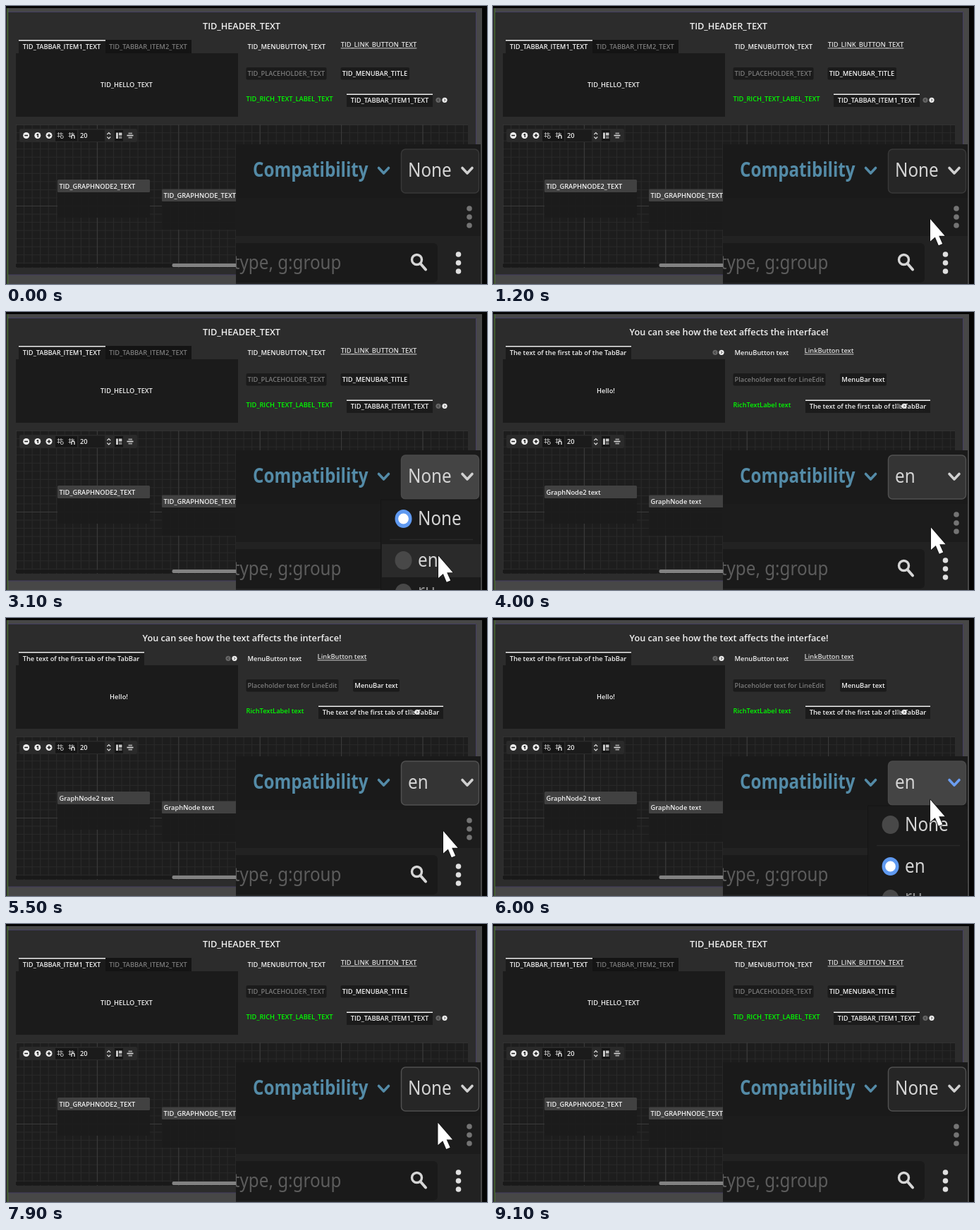
An HTML page that plays this animation: 682 px wide and 394 px high, repeating every 9.6 s.

```html
<!DOCTYPE html>
<html lang="en">
<head>
<meta charset="utf-8">
<title>Translation preview</title>
<style>
html, body { margin: 0; width: 100%; height: 100%; overflow: hidden; background: #050505; }
svg { display: block; width: 682px; height: 394px; }
text { font: 600 9.3px "Open Sans", sans-serif; fill: #f0f0f0; white-space: pre; }
.head { font-size: 12.7px; }
.mid { text-anchor: middle; }
.dim { fill: #7b7b7b; }
.rich { fill: #0f0; }
.link { text-decoration: underline; fill: #dcdcdc; }
.icon { font-size: 7px; font-weight: 800; fill: #191919; text-anchor: middle; }
.dark { fill: #1b1b1b; }
.title { fill: #414141; }
.zoom text { font: 400 24.2px "Noto Sans", sans-serif; fill: #d4d4d4; }
.zoom .renderer { font-weight: 700; fill: #548ba7; }
.zoom .hint { fill: #5c5c5c; }
.zoom .faint { fill: #8c8c8c; }
.chev { fill: none; stroke: #d0d0d0; stroke-width: 3.6; stroke-linecap: round; stroke-linejoin: round; }
.hidden { display: none; }
#button { fill: #262626; stroke: #383838; stroke-width: 1.5; }
#button.focus { stroke: #505050; }
#button.picked { fill: #343434; }
#button.hover { fill: #363636; }
#button.open { fill: #444; stroke: #4a4a4a; }
#arrow.hover { stroke: #6b9df0; }
.row { fill: #1b1b1b; }
.row.hover { fill: #2a2a2a; }
.radio { fill: #484848; }
.radio.on { fill: #5f99f0; }
.radio + circle { fill: #fff; visibility: hidden; }
.radio.on + circle { visibility: visible; }
</style>
</head>
<body>
<svg viewBox="0 0 682 394">
  <defs>
    <pattern id="minor" x="13.5" y="167.6" width="11.54" height="11.54" patternUnits="userSpaceOnUse">
      <path d="M.5 0V11.54M0 .5H11.54" stroke="#292929" fill="none"/>
    </pattern>
    <pattern id="major" x="13.5" y="167.6" width="115.4" height="115.4" patternUnits="userSpaceOnUse">
      <path d="M.5 0V115.4M0 .5H115.4" stroke="#3b3b3b" fill="none"/>
    </pattern>
    <clipPath id="inset"><path d="M326 196H673V394H326Z"/></clipPath>
    <g id="pager">
      <circle cx="-4.5" r="3.6" fill="#676767"/>
      <path d="M-3.8 -1.6L-5.4 0L-3.8 1.6" fill="none" stroke="#222"/>
      <circle cx="4.5" r="3.6" fill="#eee"/>
      <path d="M3.8 -1.6L5.4 0L3.8 1.6" fill="none" stroke="#222"/>
    </g>
    <g id="snap" fill="none" stroke="#bbb" stroke-width=".9">
      <path d="M-2.5 -4.5V3M1 -4.5V0M-4.5 -2.5H4M-4.5 1H0"/>
    </g>
  </defs>

  <!-- Editor viewport -->
  <path d="M0 3H675V394H0Z" fill="#474747"/>
  <path d="M2 8H667V381H2Z" fill="#2c2c2c"/>
  <path d="M2 8.5H666.5V381H2" fill="none" stroke="#443f63"/>
  <path d="M2.5 3V394" stroke="#4d7a30"/>
  <path d="M0 3H2V394H0Z" fill="#303030"/>

  <path class="dark" d="M14 67H329V157H14Z"/>

  <g id="keys">
    <text class="head mid" x="334" y="32.5">TID_HEADER_TEXT</text>
    <path class="dark" d="M18 48H141V67H18Z"/>
    <path d="M141 48H263V67H141Z" fill="#141414"/>
    <path d="M18 48H141V49.6H18Z" fill="#eee"/>
    <text class="mid" x="79" y="61">TID_TABBAR_ITEM1_TEXT</text>
    <text class="mid dim" x="201.5" y="61">TID_TABBAR_ITEM2_TEXT</text>
    <text class="mid" x="171" y="114.5">TID_HELLO_TEXT</text>
    <text x="342.5" y="61">TID_MENUBUTTON_TEXT</text>
    <text class="mid link" x="528.5" y="58.4">TID_LINK_BUTTON_TEXT</text>
    <rect class="dark" x="340.5" y="87" width="114" height="17.5" rx="2"/>
    <text class="dim" x="342.5" y="99.3">TID_PLACEHOLDER_TEXT</text>
    <rect class="dark" x="474.5" y="87" width="97.5" height="17.5" rx="2"/>
    <text class="mid" x="523" y="99.3">TID_MENUBAR_TITLE</text>
    <text class="rich" x="340.5" y="134.8">TID_RICH_TEXT_LABEL_TEXT</text>
    <path class="dark" d="M483 125H605V143H483Z"/>
    <path d="M483 124.5H605V126H483Z" fill="#eee"/>
    <text class="mid" x="544" y="137">TID_TABBAR_ITEM1_TEXT</text>
    <use href="#pager" x="617.5" y="133.3"/>
  </g>

  <g id="english">
    <text class="head mid" x="334.5" y="32.5">You can see how the text affects the interface!</text>
    <path class="dark" d="M18 48H196V67H18Z"/>
    <path d="M18 48H196V49.6H18Z" fill="#eee"/>
    <text class="mid" x="106.5" y="61">The text of the first tab of the TabBar</text>
    <use href="#pager" x="319.5" y="57.3"/>
    <text class="mid" x="160" y="114.5">Hello!</text>
    <text x="342.5" y="61">MenuButton text</text>
    <text class="mid link" x="476.5" y="58.4">LinkButton text</text>
    <rect class="dark" x="340.5" y="87" width="131" height="17.5" rx="2"/>
    <text class="dim" x="342.5" y="99.3">Placeholder text for LineEdit</text>
    <rect class="dark" x="492" y="87" width="66" height="17.5" rx="2"/>
    <text class="mid" x="525" y="99.3">MenuBar text</text>
    <text class="rich" x="340.5" y="134.8">RichTextLabel text</text>
    <path class="dark" d="M443 125H620V143H443Z"/>
    <path d="M443 124.5H620V126H443Z" fill="#eee"/>
    <text class="mid" x="531.5" y="137">The text of the first tab of the TabBar</text>
    <use href="#pager" x="578.5" y="133.3"/>
  </g>

  <!-- Graph -->
  <path d="M14 168H655V371H14Z" fill="#1d1d1d"/>
  <path d="M14 168H655V371H14Z" fill="url(#minor)"/>
  <path d="M14 168H655V371H14Z" fill="url(#major)"/>
  <path d="M14 365.5H326V370H14Z" fill="#191919"/>
  <rect x="235.5" y="365" width="110" height="5" rx="2" fill="#828282"/>
  <path d="M73 264H204V300H73Z" fill="#1b1b1b" opacity=".93"/>
  <rect class="title" x="73" y="246" width="131" height="18" rx="1.5"/>
  <path d="M221 277H352V317H221Z" fill="#1b1b1b" opacity=".93"/>
  <rect class="title" x="221" y="259.5" width="131" height="17.5" rx="1.5"/>
  <g id="nodeKeys">
    <text x="75.5" y="258.5">TID_GRAPHNODE2_TEXT</text>
    <text x="223.5" y="271.8">TID_GRAPHNODE_TEXT</text>
  </g>
  <g id="nodeEnglish">
    <text x="75.5" y="258.5">GraphNode2 text</text>
    <text x="223.5" y="271.8">GraphNode text</text>
  </g>

  <!-- Graph toolbar -->
  <rect x="19" y="174" width="167" height="19" rx="2" fill="#2a2a2a"/>
  <g fill="#eee">
    <circle cx="28.7" cy="183.5" r="4.5"/><circle cx="44.8" cy="183.5" r="4.5"/><circle cx="61" cy="183.5" r="4.5"/>
  </g>
  <path d="M26.3 183.5H31.1M58.6 183.5H63.4M61 181.1V185.9" stroke="#191919" stroke-width="1.4"/>
  <text class="icon" x="44.8" y="186">1</text>
  <path d="M70 176H101V191.5H70ZM154 176H166V191.5H154Z" fill="#151515"/>
  <path class="dark" d="M102.5 175.5H140V192H102.5Z"/>
  <use href="#snap" x="77" y="183.5"/>
  <circle cx="79.3" cy="185.6" r="2" fill="none" stroke="#ccc"/>
  <use href="#snap" x="93" y="183.5"/>
  <path d="M93 188V185A2 2 0 0 1 97 185V188" fill="none" stroke="#eee" stroke-width="1.3"/>
  <text x="105" y="187">20</text>
  <path d="M143.4 182L145.8 179.6L148.2 182M143.4 185.5L145.8 187.9L148.2 185.5" fill="none" stroke="#ddd" stroke-width="1.2"/>
  <path d="M156 179.5H159V188H156ZM160 179.5H164.5V183.5H160Z" fill="#c8c8c8"/>
  <path d="M160 184.5H164.5V188H160Z" fill="#777"/>
  <path d="M171.5 183.5H180.5" stroke="#ddd" stroke-width="1.6"/>
  <path d="M173.5 179.5H179V181.5H173.5ZM173.5 185.5H179V187.5H173.5Z" fill="#999"/>

  <!-- Magnified editor corner -->
  <g class="zoom" clip-path="url(#inset)">
    <path d="M326 196H673V394H326Z" fill="#1a1a1a"/>
    <path d="M326 272H673V326H326Z" fill="#1c1c1c"/>
    <path d="M326 326H673V394H326Z" fill="#222"/>
    <rect x="310" y="336" width="302" height="56" rx="6" fill="#1a1a1a"/>
    <text class="renderer" transform="translate(350 241.8) scale(1 1.15)">Compatibility</text>
    <path class="chev" d="M528.5 229.5L535.5 237L542.5 229.5" style="stroke:#548ba7"/>
    <rect id="button" x="560.5" y="203" width="110" height="62" rx="6"/>
    <text id="locale" transform="translate(570 241.8) scale(1 1.15)">None</text>
    <path id="arrow" class="chev" d="M647 229.5L654 237L661 229.5"/>
    <g fill="#747474"><circle cx="657" cy="287" r="3.8"/><circle cx="657" cy="299" r="3.8"/><circle cx="657" cy="311" r="3.8"/></g>
    <text class="hint" transform="translate(322.8 372.6) scale(1 1.15)">type, g:group</text>
    <circle cx="582.5" cy="359.5" r="7" fill="none" stroke="#d6d6d6" stroke-width="3.4"/>
    <path d="M588 365.5L595 373.5" stroke="#d6d6d6" stroke-width="4" stroke-linecap="round"/>
    <g fill="#e0e0e0"><circle cx="641.5" cy="352" r="3.8"/><circle cx="641.5" cy="364" r="3.8"/><circle cx="641.5" cy="376" r="3.8"/></g>

    <g id="popup">
      <path d="M531.5 266H673V394H531.5Z" fill="#1b1b1b" stroke="#151515"/>
      <path id="rowNone" class="row" d="M533 270H673V316H533Z"/>
      <path d="M544 322.5H662" stroke="#282828" stroke-width="1.5"/>
      <path id="rowEn" class="row" d="M533 329H673V376H533Z"/>
      <ellipse id="radioNone" class="radio" cx="563.5" cy="293" rx="12" ry="13"/><circle cx="563.5" cy="293" r="7.4"/>
      <ellipse id="radioEn" class="radio" cx="563.5" cy="352" rx="12" ry="13"/><circle cx="563.5" cy="352" r="7.4"/>
      <ellipse class="radio" cx="563.5" cy="398" rx="12" ry="13"/>
      <text transform="translate(584 302) scale(1 1.15)">None</text>
      <text transform="translate(584 361.3) scale(1 1.15)">en</text>
      <text class="faint" transform="translate(584 404.5) scale(1 1.15)">ru</text>
    </g>
  </g>

  <path id="cursor" d="M0 -.5V31L6.8 25L11.8 36.8L17.2 34.4L12.2 23.2H20.6Z" fill="#fff" stroke="#161616" stroke-width="1.7" stroke-linejoin="round" paint-order="stroke"/>
</svg>
<script>
const LOOP = 9600, STEP = 100;
const $ = id => document.getElementById(id);

// Pointer stops: time, x, y
const path = [
  [0, 590, 410], [300, 595, 402], [900, 622, 309], [1000, 621, 307], [1200, 620, 302.5],
  [1500, 620, 258], [2100, 620, 258], [2700, 613, 346], [3400, 613, 346],
  [4000, 621, 306], [5400, 621, 306], [5500, 620, 302.5], [5800, 620, 258],
  [6300, 620, 258], [6500, 613, 279], [6600, 613, 279], [6700, 613, 276.5],
  [7800, 613, 276.5], [8600, 600, 410], [LOOP, 600, 410]
];

function pointer(t) {
  const i = path.findIndex(p => p[0] > t);
  const [t0, x0, y0] = path[i - 1], [t1, x1, y1] = path[i];
  const k = (t - t0) / (t1 - t0), e = k * k * (3 - 2 * k);
  return [x0 + (x1 - x0) * e, y0 + (y1 - y0) * e];
}

const within = (t, a, b) => t >= a && t < b;
const show = (id, on) => $(id).classList.toggle("hidden", !on);
const mark = (id, name, on) => $(id).classList.toggle(name, on);

function render(t) {
  const [x, y] = pointer(t);
  const english = within(t, 3300, 7500);
  const open = within(t, 1700, 3300) || within(t, 6000, 7500);
  const over = x > 560 && within(y, 203, 266);

  $("cursor").setAttribute("transform", `translate(${x} ${y})`);
  for (const id of ["keys", "nodeKeys"]) show(id, !english);
  for (const id of ["english", "nodeEnglish"]) show(id, english);
  $("locale").textContent = english ? "en" : "None";

  show("popup", open);
  mark("button", "open", open);
  mark("button", "hover", over);
  mark("button", "picked", english);
  mark("button", "focus", t >= 3300);
  mark("arrow", "hover", over);
  mark("rowNone", "hover", within(y, 270, 316));
  mark("rowEn", "hover", within(y, 329, 376));
  mark("radioNone", "on", !english);
  mark("radioEn", "on", english);
}

const start = performance.now();
function tick() {
  const t = (performance.now() - start) % LOOP;
  render(Math.floor(t / STEP) * STEP);
  requestAnimationFrame(tick);
}
tick();
</script>
</body>
</html>
```
